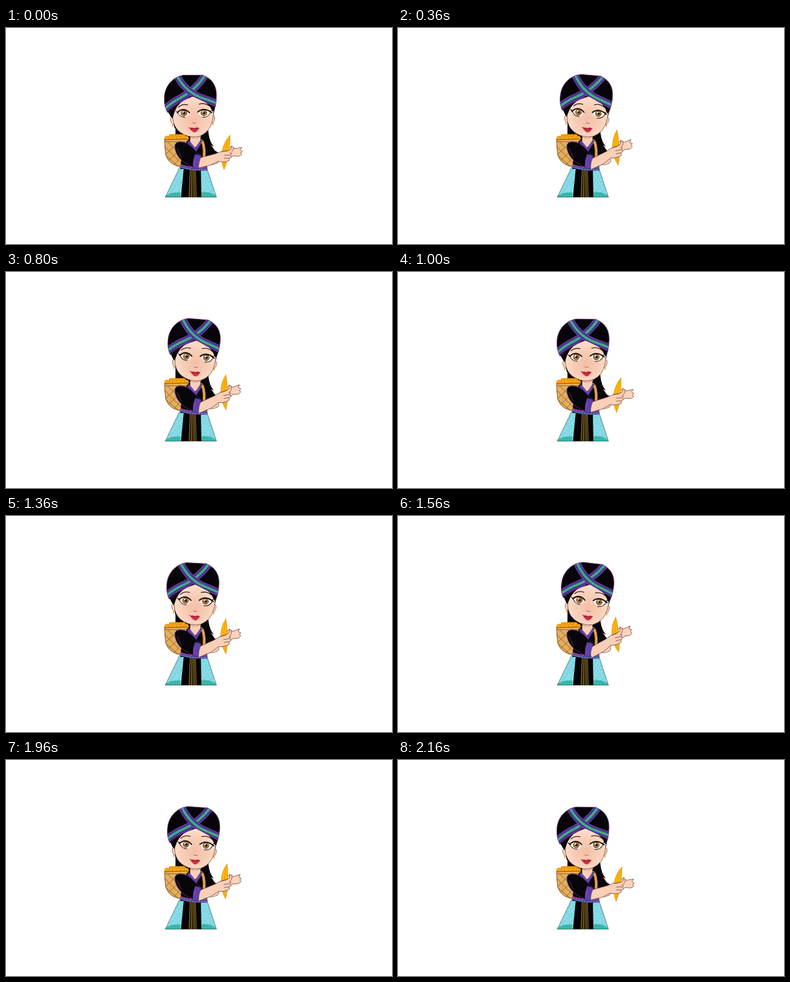
An HTML page for the animation above (2200 ms loop, 640x360 px).

```html
<!DOCTYPE html>
<html>
<head>
<meta charset="utf-8">
<style>
html, body { margin: 0; width: 100%; height: 100%; overflow: hidden; background: #fff; }
svg { display: block; width: 640px; height: 360px; }
</style>
</head>
<body>
<svg viewBox="0 0 640 360" fill="none" stroke-linecap="round" stroke-linejoin="round">
  <defs>
    <radialGradient id="skin" gradientUnits="userSpaceOnUse" cx="311" cy="152" r="38">
      <stop offset="0" stop-color="#f3bfa5"/>
      <stop offset=".55" stop-color="#f8cdb6"/>
      <stop offset="1" stop-color="#fde0cf"/>
    </radialGradient>
    <clipPath id="hatShape">
      <path id="dome" d="M268 141C264 134 262 126 262.500 116C263 98 275 82 294 78.500H326C341 84 349 95 349 112Q349 122 347 131L310 114Q287 122 268 141Z"/>
    </clipPath>
    <clipPath id="basketShape">
      <path id="weave" d="M263 186L302 185L300 230Q293 232 284 230Q270 226 265 212Q263 200 263 186Z"/>
    </clipPath>
    <clipPath id="skirtShape">
      <path id="cloth" d="M288 232H333L349 282H264Z"/>
    </clipPath>
  </defs>

  <!-- hair behind the neck -->
  <path fill="#08060a" d="M281 150L281 182L304 189L325 186Q335 194 344.500 197.500Q338 190 336 177L334 160Z"/>

  <!-- skirt -->
  <use href="#cloth" fill="#86dce6"/>
  <g clip-path="url(#skirtShape)">
    <path fill="#35b5a8" d="M262 283Q268 273 289 274V283ZM324 274Q342 271 351 283H324Z"/>
    <g id="flecks" stroke-width="1"></g>
    <path fill="#050406" d="M295 231H323L324 283H290Z"/>
    <path fill="#2d230c" d="M305 236H314L315 283H303Z"/>
    <path stroke="#a5832d" stroke-width=".9" d="M305.500 236L303.500 283M308.500 236L307.500 283M311.500 236L312 283M314 236L315.500 283"/>
  </g>
  <path stroke="#26323b" stroke-width=".8" stroke-dasharray="1 1.500" d="M288 232L264 282H349L333 234"/>

  <!-- basket -->
  <g id="fruit" fill="#fca70c" stroke="#d98206" stroke-width=".7"></g>
  <use href="#weave" fill="#e2ae61"/>
  <path clip-path="url(#basketShape)" stroke="#9a611e" stroke-width="1" d="M262 196L301 236M262 210L292 236M268 190L301 221M261 214L289 188M266 224L300 192M276 230L302 204M263 189.500H302"/>
  <use href="#weave" stroke="#7b4714" stroke-width="1"/>

  <!-- jacket -->
  <path fill="#08060b" d="M300 188L326 187Q340 192 346 204L354 209L350 226L334 222L333 235H289L291 215Z"/>
  <path fill="#f8cfb8" stroke="#2b1a17" stroke-width=".5" d="M338 228Q346 229 353 223L351 211L343 219Z"/>
  <path fill="#f8cfb8" d="M306 176H323L322 192L313 200L305 192Z"/>
  <path stroke="#e6a98d" stroke-width="1.500" d="M307 182Q314 186 322 181"/>
  <path stroke="#653eae" stroke-width="4" stroke-linecap="butt" d="M302 189L314 204L324 189"/>
  <path stroke="#2c1a58" stroke-width=".6" d="M304 188L314 200L322 188"/>
  <path stroke="#8b541a" stroke-width="5" d="M326 190Q330 201 328 219"/>
  <path stroke="#e0a550" stroke-width="3.600" d="M326 190Q330 201 328 219"/>
  <path stroke="#5a37a2" stroke-width="6" stroke-linecap="butt" d="M289 230Q310 237 334 234"/>
  <path stroke="#e5528c" stroke-width="1.200" stroke-dasharray="3 2" d="M290 228Q310 235 334 232"/>
  <path stroke="#38b5a7" stroke-width="1.200" stroke-dasharray="3 2" d="M289 231Q310 238 334 235"/>

  <!-- forearm, hands and corn -->
  <g id="arm" stroke="#71402f" stroke-width=".8">
    <path fill="#fbd3bd" d="M365 203Q370 197 376 198L379 201L391 199L388 203L392 206L389 208L391 211L386 214L377 213L370 217L364 213Z"/>
    <path fill="#fbb50c" stroke="#dc8d04" d="M371.500 179Q362 188 358 206Q356 222 361.500 236Q368 221 369 207Q372 192 371.500 179Z"/>
    <path stroke="#e99c06" d="M369 185Q361 207 362 230"/>
    <path fill="#f9cfb8" d="M315 218L346 210L357 206L371 204Q374 206 370 208L374 210L372 213L374 215L370 218L370 221Q361 225 352 222L338 229L316 234Z"/>
    <path fill="#f9cfb8" d="M358 206Q368 206 373 202L374 196L377 199Q378 204 372 209"/>
    <path d="M362 212L371 212M362 217L370 217"/>
  </g>

  <!-- near sleeve -->
  <path fill="#08060b" stroke="#5b3799" stroke-width=".8" d="M283 191Q295 187 307 197L321 211L313 233Q295 226 287 216Q279 205 280 195Z"/>
  <path fill="#6140aa" stroke="#30205f" stroke-width=".6" d="M314 210L324 213Q319 223 319 235L310 233Q309 220 314 210Z"/>
  <path stroke="#d45a9a" stroke-width=".8" stroke-dasharray="1 2" d="M284 201L291 217M313 216L312 231"/>

  <!-- head -->
  <g id="head">
    <path fill="#08060a" d="M267 136L275 151L280 168L288 160L304 120L340 138L344 145L348 126L310 108Z"/>
    <path fill="#f9cfb8" stroke="#54312a" stroke-width=".6" d="M278 148Q271 147 273 155Q275 162 280 160ZM342 146Q347 144 346 152Q344 160 340 159Z"/>
    <path stroke="#e4a324" stroke-width="1.500" d="M276 160V164M343 158V162"/>
    <path fill="url(#skin)" stroke="#5c3329" stroke-width=".7" d="M307 113Q287 121 277 141C275 159 282 171 294 177Q307 184 322 180Q340 172 343 151L345 131Q329 119 307 113Z"/>
    <path fill="#08060a" d="M305 114Q287 122 280 138L276 151L268 139L287 121ZM322 119Q336 124 343 140L348 129L330 118Z"/>

    <use href="#dome" fill="#07050a"/>
    <g id="bands" clip-path="url(#hatShape)" stroke-linecap="butt"></g>
    <use href="#dome" stroke="#883b87" stroke-width=".9" stroke-dasharray="1.500 1"/>

    <path stroke="#33231f" stroke-width="1.300" d="M286 132Q292 126 301 128M320 127Q329 124 337 130"/>
    <path fill="#fff" d="M285 142Q294 132 304 141Q302 149 293 149Q287 147 285 142ZM318 140Q328 132 339 141Q336 149 327 148Q320 146 318 140Z"/>
    <g fill="#aa783d" stroke="#64401d" stroke-width=".8">
      <circle cx="295" cy="142" r="5"/><circle cx="328" cy="141.500" r="5"/>
    </g>
    <g fill="#25150c"><circle cx="295.500" cy="142" r="2"/><circle cx="328.500" cy="141.500" r="2"/></g>
    <g fill="#fff"><circle cx="293.500" cy="140" r="1.200"/><circle cx="326.500" cy="139.500" r="1.200"/></g>
    <path stroke="#100b0b" stroke-width="2" d="M284 141Q294 131 304 141M318 140Q328 131 341 141"/>
    <path stroke="#100b0b" stroke-width="1" d="M284 139Q287 149 297 149M339 140Q337 149 326 149M284 141L281 138M339 139L342 136"/>
    <path stroke="#ad6757" stroke-width="1" d="M309 158Q312 160 315 158"/>
    <path fill="#ce3049" d="M304 167Q309 165 312 167Q316 164 320 167Q317 174 312 174Q307 172 304 167Z"/>
    <path stroke="#85172e" stroke-width=".9" d="M303 166Q311 170 320 167"/>
  </g>
</svg>
<script>
const $ = id => document.getElementById(id);
const path = (d, color, width, dash = "") =>
  `<path d="${d}" stroke="${color}" stroke-width="${width}" stroke-dasharray="${dash}"/>`;

const band = d => path(d, "#6e3c9c", 12) + path(d, "#45308d", 9) +
  path(d, "#2a9b9c", 4.5) + path(d, "#a8b83c", 1.6, "2 2");
$("bands").innerHTML = band("M332 76Q316 102 290 116Q274 124 260 138") +
  band("M283 79Q297 105 321 115L354 127");

let flecks = "";
for (let row = 0; row < 9; row++) {
  for (let col = 0; col < 14; col++) {
    const x = 264 + col * 6 + row % 2 * 3;
    const y = 237 + row * 5 + col % 3;
    flecks += path(`M${x} ${y}l2 -1`, (row + col) % 3 ? "#54bcc8" : "#c2a9c7", .9);
  }
}
$("flecks").innerHTML = flecks;

let fruit = "";
for (let i = 0; i < 11; i++) {
  const x = i < 5 ? 274 + i * 5 : 267 + (i - 5) * 6.4;
  fruit += `<circle cx="${x}" cy="${i < 5 ? 181 : 184}" r="4"/>`;
}
$("fruit").innerHTML = fruit;

// [time in ms, degrees]
const headKeys = [[0, 0], [40, -.7], [580, 9], [1110, -1.3], [1680, 8.8], [2200, 0]];
const armKeys = [[0, 0], [360, -12], [580, -18], [1000, -3], [1110, -1.8],
  [1360, -10], [1680, -17.3], [2160, -.6], [2200, 0]];

function at(keys, t) {
  const i = keys.findIndex(k => k[0] > t);
  const [t0, a] = keys[i - 1], [t1, b] = keys[i];
  return a + (b - a) * (t - t0) / (t1 - t0);
}

const start = performance.now();
function draw() {
  const t = Math.floor((performance.now() - start) % 2200 / 40) * 40;
  $("head").setAttribute("transform", `rotate(${at(headKeys, t)} 313 190)`);
  $("arm").setAttribute("transform", `rotate(${at(armKeys, t)} 327 215)`);
  requestAnimationFrame(draw);
}
draw();
</script>
</body>
</html>
```
